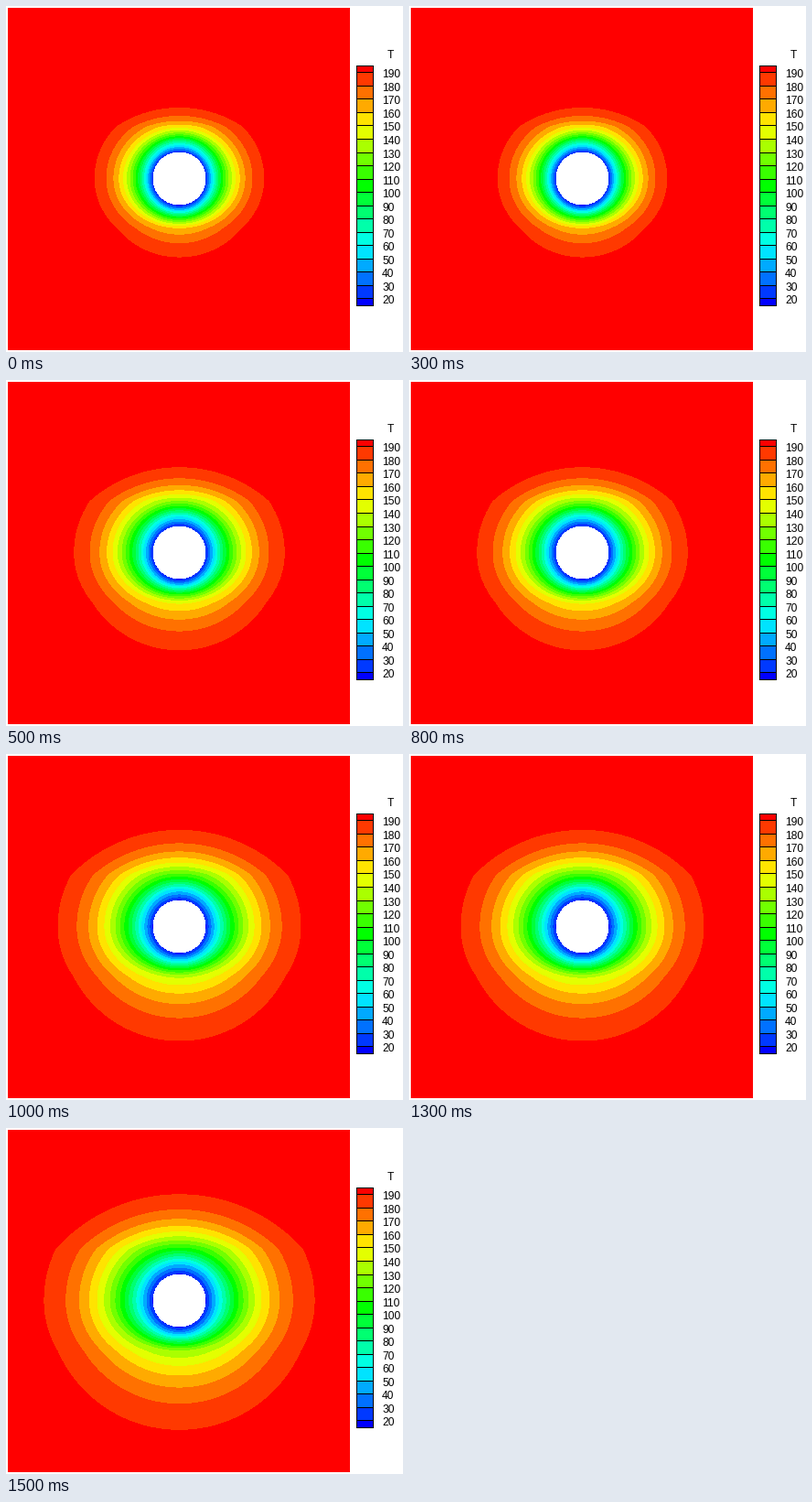
A matplotlib script that plays this animation: 434x378 px, repeating every 2 s.

```python
import math

import numpy as np
import matplotlib.pyplot as plt
from matplotlib.animation import FuncAnimation
from matplotlib.patches import Circle, Polygon, Rectangle

W, H, DPI = 434, 378, 100
CX, CY, HOLE = 189.5, 188.5, 28
UP, DOWN = 56, 54            # distance from the centre to the layer interfaces
LEVELS = np.arange(190, 10, -10)
Z = np.linspace(0, 2, 400)
ERF = [math.erf(z) for z in Z]


def rainbow(u):
    """Blue, cyan, green, yellow, red for u from 0 to 1."""
    stops = [0, .25, .5, .75, 1]
    return tuple(np.interp(u, stops, c) for c in
                 ([0, 0, 0, 1, 1], [0, 1, 1, 1, 0], [1, 1, 0, 0, 0]))


def extents(step, level):
    """Distances from the centre to an isotherm: side, top and bottom."""
    z = np.interp((level - 18) / 182, ERF, Z)
    spread = math.sqrt(1 + .82 * step)
    side = spread * z * (36.5 + 8 * z)
    top = min(side, 4 + .7 * side)
    limit = 58 - 20 / spread       # side at which the lower interface is met
    gap = DOWN - HOLE
    if side < limit:
        bottom = gap * (side / limit) ** .8
    else:
        bottom = gap + 1.2 * (side - limit)
    return HOLE + side, HOLE + top, HOLE + bottom


def quarter(side, reach, edge, stretch):
    """Ellipse up to the interface, then a circular arc to the axis."""
    if reach <= edge:
        a = np.linspace(0, np.pi / 2, 60)
        return side * np.cos(a), reach * np.sin(a)
    sag = reach - edge
    height = edge + stretch * sag
    a = np.linspace(0, np.arcsin(edge / height), 40)
    x, y = side * np.cos(a), height * np.sin(a)
    radius = (x[-1] ** 2 + sag ** 2) / (2 * sag)
    b = np.linspace(np.arctan2(x[-1], radius - sag), 0, 60)
    return (np.append(x, radius * np.sin(b)),
            np.append(y, reach - radius + radius * np.cos(b)))


def outline(step, level):
    side, top, bottom = extents(step, level)
    ux, uy = quarter(side, top, UP, 1.35)
    dx, dy = quarter(side, bottom, DOWN, .8)
    x = np.append(ux[::-1], dx)
    y = np.append(-uy[::-1], dy)
    return np.column_stack([CX + np.append(x, -x[::-1]),
                            CY + np.append(y, y[::-1])])


fig = plt.figure(figsize=(W / DPI, H / DPI), dpi=DPI, facecolor="white")
ax = fig.add_axes([0, 0, 1, 1])
ax.set(xlim=(0, W), ylim=(H, 0))
ax.axis("off")


def box(x0, y0, x1, y1, color):
    ax.add_patch(Rectangle((x0, y0), x1 - x0, y1 - y0, fc=color, lw=0,
                           antialiased=False))


def label(x, y, text):
    ax.text(x, y, text, family="Liberation Sans", size=12 * 72 / DPI,
            va="baseline", ha="left")


box(2, 2, 376, 376, "red")
bands = []
for level in LEVELS:
    band = Polygon([(CX, CY)] * 3, fc=rainbow((level - 20) / 180), lw=0,
                   antialiased=False)
    bands.append(ax.add_patch(band))
ax.add_patch(Circle((CX, CY), HOLE + .5, fc="white", lw=0, antialiased=False))

# Legend: coloured cells on black leave one-pixel lines
box(383, 65, 402, 328, "black")
ticks = np.round(73.35 + 14.53 * np.arange(len(LEVELS)))
edges = [66, *ticks, 328]
for i in range(len(edges) - 1):
    box(384, edges[i], 401, edges[i + 1] - 1, rainbow(1 - i / 18))
for y, level in zip(ticks, LEVELS):
    label(411, y + 5, str(level))
label(417, 57, "T")


def draw(step):
    for band, level in zip(bands, LEVELS):
        band.set_xy(outline(step, level))
    return bands


anim = FuncAnimation(fig, draw, frames=4, interval=500,
                     repeat=True, repeat_delay=0)
plt.show()
```
